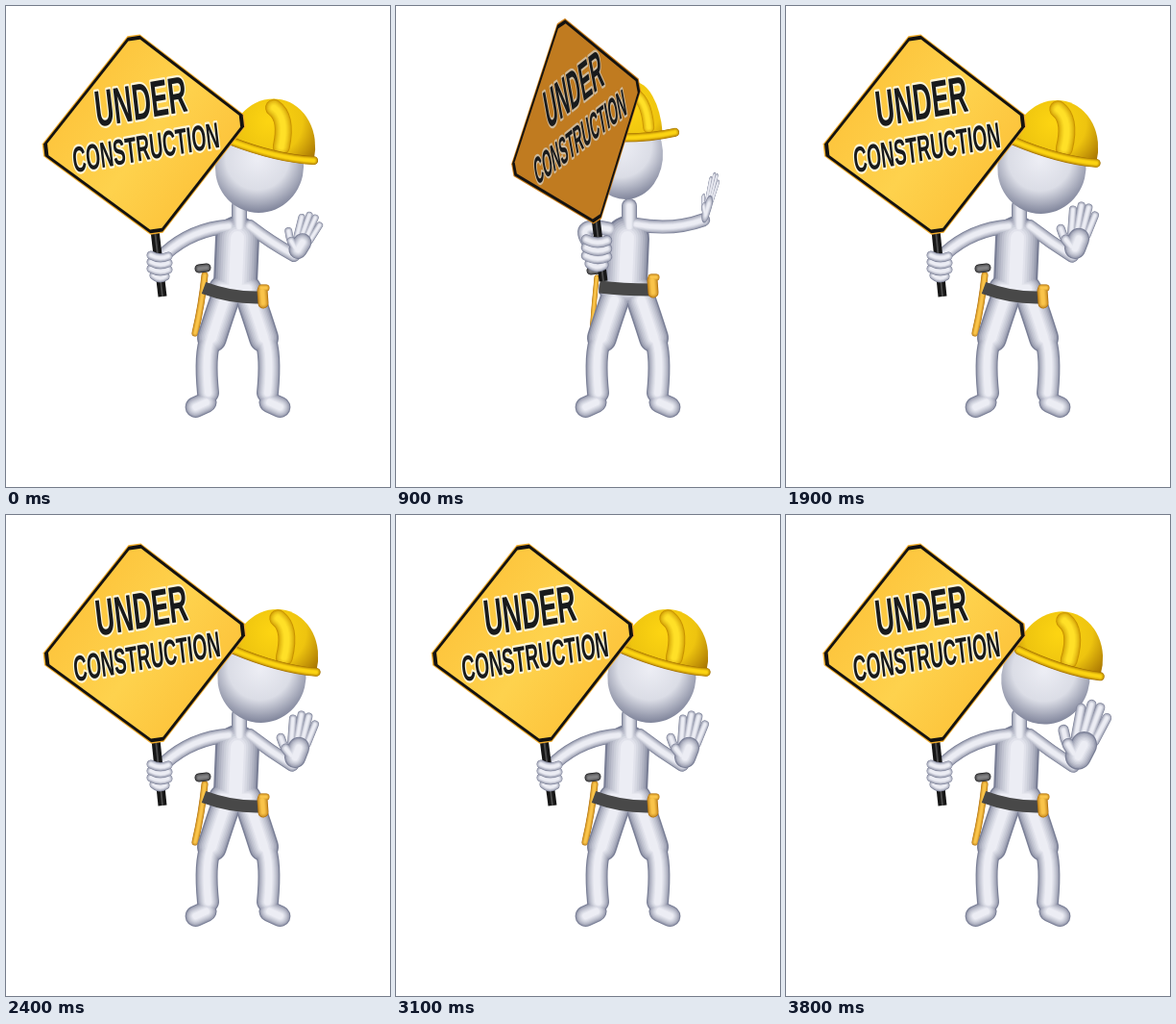
Animation of 400 by 500 pixels, one loop 4000 ms. Source, as an HTML page with a canvas:

```html
<!DOCTYPE html>
<html lang="en">
<head>
<meta charset="utf-8">
<title>Under construction</title>
<style>
html, body { margin: 0; width: 100%; height: 100%; overflow: hidden; background: #fff; }
canvas { display: block; }
</style>
</head>
<body>
<canvas id="stage" width="400" height="500"></canvas>
<script>
const ctx = document.getElementById('stage').getContext('2d');
const SKIN = [[236, 237, 244], [122, 127, 150]];
const HAT = [[252, 212, 18], [160, 108, 0]];
const RIDGE = [[255, 224, 40], [200, 146, 0]];
const GOLD = [[250, 196, 74], [176, 112, 14]];
const STEEL = [[130, 130, 132], [30, 30, 32]];
const rad = Math.PI / 180;

// Set once per frame: turn is 0 facing the viewer and 1 side on.
let turn, wave, sway, drift;

const lerp = (a, b, t) => a.map((v, i) => v + (b[i] - v) * t);
const pose = (front, side) => lerp(front, side, turn);
const rgb = c => `rgb(${c.map(Math.round)})`;
const smooth = (t, from, to) => {
  const x = Math.min(1, Math.max(0, (t - from) / (to - from)));
  return x * x * (3 - 2 * x);
};

function line(points) {
  const path = new Path2D(), [x, y, ...rest] = points;
  path.moveTo(x, y);
  rest.length > 2 ? path.quadraticCurveTo(...rest) : path.lineTo(...rest);
  return path;
}

function oval(x, y, rx, ry, from = 0, to = 7) {
  const path = new Path2D();
  path.ellipse(x, y, rx, ry, 0, from, to);
  return path;
}

// Rounded limbs shaded from edge to middle; limbs of one call merge without seams.
function tubes([light, dark], limbs) {
  ctx.lineCap = ctx.lineJoin = 'round';
  for (let i = 0; i < 8; i++) {
    ctx.strokeStyle = rgb(lerp(dark, light, (i / 7) ** 0.6));
    for (const [width, points] of limbs) {
      ctx.lineWidth = width * (1 - i * 0.1);
      ctx.stroke(line(points));
    }
  }
}

function flat(color, width, points) {
  ctx.lineCap = 'butt';
  ctx.strokeStyle = color;
  ctx.lineWidth = width;
  ctx.stroke(line(points));
}

// Runs a drawing in its own coordinate system.
function at(x, y, angle, sx, sy, drawing) {
  ctx.save();
  ctx.translate(x, y);
  ctx.rotate(angle * rad);
  ctx.scale(sx, sy);
  drawing();
  ctx.restore();
}

function shaded(path, [light, dark], x, y, radius) {
  const glow = ctx.createRadialGradient(x, y, 2, x, y, radius);
  glow.addColorStop(0, rgb(light));
  glow.addColorStop(0.55, rgb(lerp(light, dark, 0.15)));
  glow.addColorStop(1, rgb(dark));
  ctx.fillStyle = glow;
  ctx.fill(path);
}

// Where the waving hand joins its arm.
const wrist = () => pose([299 + sway, 262 + 2 * wave], [316 + 12 * wave, 225 + wave]);

function drawBody() {
  const [hx, hy] = pose([207, 280], [209, 282]);
  tubes(GOLD, [[7 - 2 * turn, [hx, hy, hx - 3, hy + 30, hx - 10 + 5 * turn, 340]]]);
  tubes(STEEL, [[9, [hx - 6, hy - 7, hx + 2, hy - 8]]]);

  const [wx, wy] = wrist();
  const limbs = [
    [16, [243, 208, 243, 230]],
    [46, [241, 241, 239, 288]],
    [28, [225, 294, 252, 294]],
    [15, pose([232, 229, 194, 232, 166, 257], [222, 232, 186, 224, 201, 246])],
    [14, [...pose([254, 229, 276, 246], [250, 227, 288, 236 - 6 * wave]), wx, wy - 3]]
  ];
  for (const side of [-1, 1]) {
    const x = d => 241.5 + side * d;
    limbs.push(
      [31, [x(14), 306, x(19), 320, x(27), 345]],
      [23, [x(28), 345, x(35), 362, x(31), 402]],
      [22, [x(33), 412, x(44), 417]]);
  }
  tubes(SKIN, limbs);

  const [beltY, sag] = pose([293, 11], [292, 3]);
  flat('#484848', 13, [206 + 6 * turn, beltY, 236, beltY + sag, 265, 303 - 8 * turn]);
  const pouchY = 293 - 11 * turn;
  tubes(GOLD, [[11, [267, pouchY + 3, 268, pouchY + 16]], [7, [266, pouchY, 271, pouchY]]]);
}

function drawHead() {
  const [x, y, rx, tilt] = pose([264 + 7 * wave, 167 + 3 * wave, 46, 12 + 5 * wave], [238, 153, 40, -4]);
  at(x, y, tilt, 1, 1, () => {
    shaded(oval(0, 0, rx, 48), SKIN, -4, -8, 58);
    const domeX = 8 + 7 * turn, domeR = rx - 14 * turn;
    shaded(oval(domeX, -19, domeR, 54, Math.PI, 2 * Math.PI), HAT, domeX - 8, -48, 62);
    const front = 9 * turn, width = 18 - 6 * turn;
    tubes(RIDGE, [[width, [front + 2, -63, front + 18, -56, front + 18, -25]]]);
    tubes(HAT, [[9, [-35, -20, 15, -12, 54, -18]]]);
  });
}

function drawWavingHand() {
  const [sx] = lerp([0.88 + 0.4 * wave], [0.36], turn ** 3);
  const [sy, angle] = pose([0.87 + 0.45 * wave, 14.5 + 5.5 * sway], [0.92, 14 - 3 * wave]);
  at(...wrist(), angle, sx, sy, () => {
    const fingers = [0, 1, 2, 3].map(i => {
      const tip = 7.7 * i - 8;
      return [8, [tip * 0.7, -26, tip, 3 * (i - 1.4) ** 2 - 55]];
    });
    tubes(SKIN, [[9, [-2, -11, -11, -16, -17, -28]], ...fingers]);
    tubes(SKIN, [[22, [3, -21, 1, -11]], [10, [-3, -12, -10, -18]]]);
  });
}

// Octagon: a diamond through the four corner centres, enlarged and clipped.
function plate(corners, cx, cy, size) {
  const path = new Path2D();
  const corner = i => lerp([cx, cy], corners[(i + 4) % 4], size * 1.058);
  for (let i = 0; i < 4; i++)
    for (const next of [i - 1, i + 1])
      path.lineTo(...lerp(corner(i), corner(next), 0.058));
  path.closePath();
  return path;
}

function drawSign() {
  const shift = drift * (1 - turn);
  const corners = [
    [[38, 150], [121, 171]], [[133, 30], [172, 15]],
    [[249, 119], [254, 82]], [[157, 237], [210, 224]]
  ].map(([front, side]) => pose(front, side)).map(([x, y]) => [x - shift, y]);
  const [left, top, right, bottom] = corners;
  const cx = (left[0] + top[0] + right[0] + bottom[0]) / 4;
  const cy = (left[1] + top[1] + right[1] + bottom[1]) / 4;

  const pole = [bottom[0] - 2, bottom[1] - 4, ...pose([163, 302], [216, 286])];
  flat('#161616', 9, pole);
  flat('#4a4a4a', 2, pole);

  const face = pose([253, 198, 62], [192, 123, 32]);
  const sheen = ctx.createLinearGradient(...left, ...bottom);
  [0, 0.55, 1].forEach((stop, i) =>
    sheen.addColorStop(stop, rgb(lerp(face, [255, 225, 95], i % 2 * 0.45 * (1 - turn)))));
  const edge = rgb(lerp(face, [225, 135, 20], 0.4));
  [[1, edge], [0.987, '#141210'], [0.95, sheen]].forEach(([size, fill]) => {
    ctx.fillStyle = fill;
    ctx.fill(plate(corners, cx, cy, size));
  });

  // Condensed lettering lies in the plane of the sign.
  ctx.save();
  ctx.transform((right[0] - left[0]) / 200, (right[1] - left[1]) / 200,
    (bottom[0] - top[0]) / 200, (bottom[1] - top[1]) / 200, cx, cy);
  ctx.transform(0.5, -0.014 - 0.02 * turn, 0, 1, 0, 0);
  ctx.textAlign = 'center';
  ctx.lineJoin = 'round';
  ctx.lineWidth = 4.5;
  ctx.strokeStyle = rgb(pose([255, 246, 215], [205, 185, 155]));
  ctx.fillStyle = '#181a1c';
  [['UNDER', 51, -16, 6 * turn], ['CONSTRUCTION', 36, 25, 0]].forEach(([word, size, y, x]) => {
    ctx.font = `bold ${size}px "Liberation Sans", Arial, sans-serif`;
    ctx.strokeText(word, x, y);
    ctx.fillText(word, x, y);
  });
  ctx.restore();

  // Fist around the pole.
  const [fx, fy, scale] = pose([160, 271, 1], [209, 257, 1.2]);
  at(fx, fy, 0, scale, scale, () => {
    for (let i = 3; i >= 0; i--) {
      const y = i * 7 - 11, reach = i < 3 ? 9 : 6;
      tubes(SKIN, [[9, [-reach, y - 1, 0, y + 4, reach, y]]]);
    }
  });
}

function draw(now) {
  const t = Math.min(Math.floor(now % 4000 / 100), 38) * 100;
  const phase = t / 500 * 2 * Math.PI;
  wave = 0.5 - 0.5 * Math.cos(phase);
  sway = Math.cos(2 * phase);
  drift = Math.sin(phase);
  turn = smooth(t, 0, 330) - smooth(t, 1450, 1850);
  ctx.fillStyle = '#fff';
  ctx.fillRect(0, 0, 400, 500);
  drawBody();
  drawHead();
  drawWavingHand();
  drawSign();
  requestAnimationFrame(draw);
}
requestAnimationFrame(draw);
</script>
</body>
</html>
```
